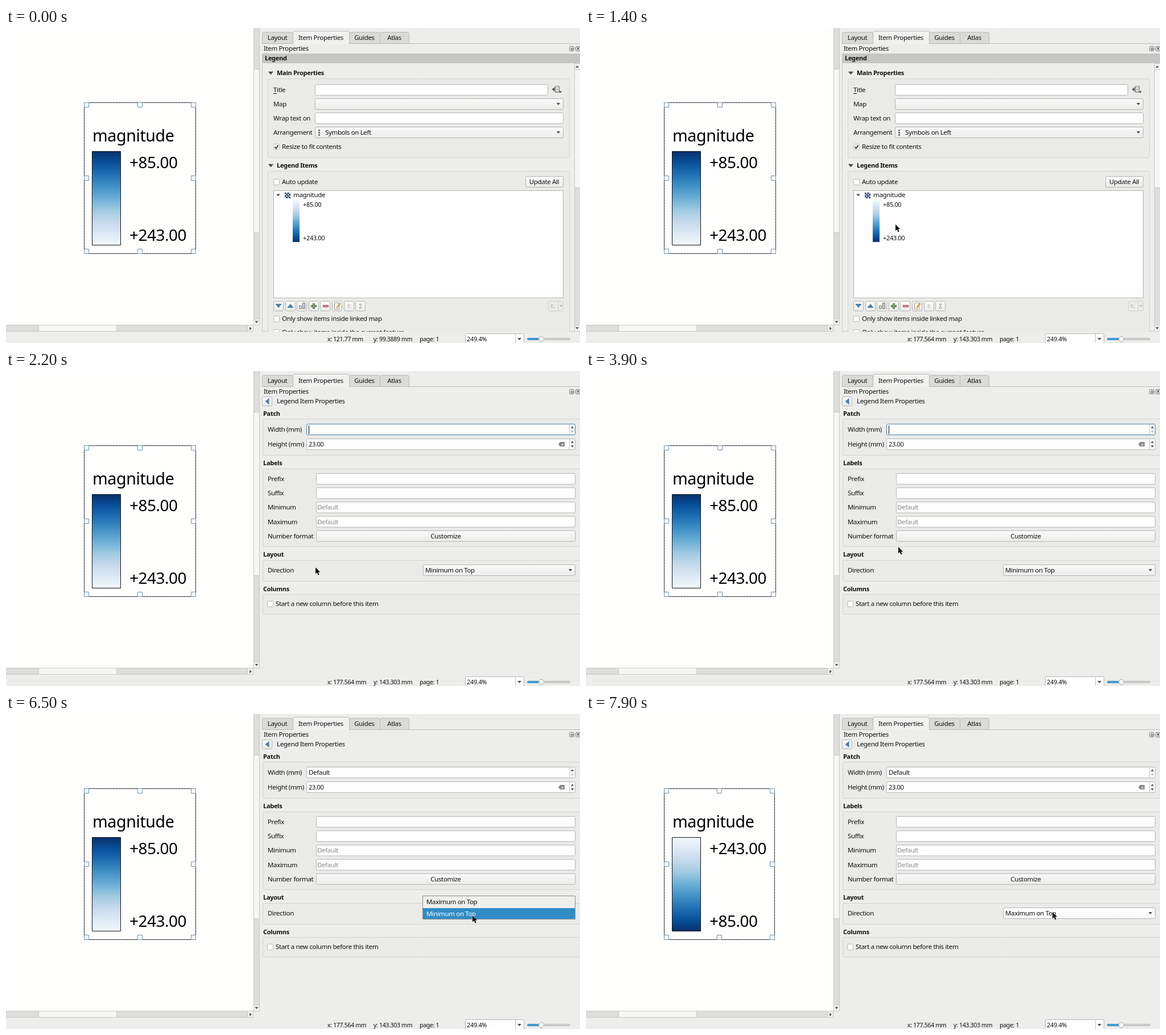
Write an HTML page with a canvas that moves like this. It is 1009 px wide and 555 px high and loops after 8 s.

```html
<!DOCTYPE html>
<html lang="en">
<head>
<meta charset="utf-8">
<title>Legend direction</title>
<style>
html, body { margin: 0; width: 100%; height: 100%; overflow: hidden; background: #ededeb; }
canvas { display: block; }
</style>
</head>
<body>
<canvas id="stage" width="1009" height="555"></canvas>
<script>
const ctx = document.getElementById('stage').getContext('2d');
const LOOP = 8000, STEP = 100;
const BG = '#ededeb', LINE = '#b4b4b2', INK = '#101010', BLUE = '#308cc6';
const BLUES = ['#f4f9fc', '#dde9f5', '#c6d9ec', '#9ecae1', '#6baed6', '#4292c6', '#2171b5', '#08519c', '#08306b'];

// Pointer track: time, x, y
const TRACK = [
  [400, 123, 56], [1200, 494, 334], [1300, 536, 357], [1400, 544, 346], [3600, 544, 346],
  [3900, 549, 310], [4500, 580, 306], [5100, 650, 293], [5300, 650, 293], [5700, 693, 284],
  [6000, 760, 293], [6100, 760, 293], [6300, 814, 348], [6500, 820, 355], [6800, 820, 355],
  [7000, 820, 331], [7700, 820, 331], [7900, 820, 349]
];
const CARET_OFF = [3000, 4000, 4900, 5600];

function pointerAt(t) {
  if (t < TRACK[0][0]) return null;
  const i = TRACK.findIndex(k => k[0] > t);
  if (i < 0) return TRACK[TRACK.length - 1].slice(1);
  const [t0, x0, y0] = TRACK[i - 1], [t1, x1, y1] = TRACK[i];
  const p = (t - t0) / (t1 - t0);
  return [Math.round(x0 + (x1 - x0) * p), Math.round(y0 + (y1 - y0) * p)];
}

function fill(x, y, w, h, color) {
  ctx.fillStyle = color;
  ctx.fillRect(x, y, w, h);
}

function box(x, y, w, h, color, stroke = LINE, radius = 2) {
  ctx.beginPath();
  ctx.roundRect(x + .5, y + .5, w - 1, h - 1, radius);
  ctx.fillStyle = color;
  ctx.fill();
  ctx.strokeStyle = stroke;
  ctx.lineWidth = 1;
  ctx.stroke();
}

function text(s, x, y, { size = 11.5, color = INK, bold = false, align = 'left', gap = -.35 } = {}) {
  ctx.font = `${bold ? 700 : 500} ${size}px "Noto Sans", sans-serif`;
  ctx.letterSpacing = gap + 'px';
  ctx.textAlign = align;
  ctx.fillStyle = color;
  ctx.fillText(s, x, y);
}
const label = (s, x, mid, color) => text(s, x, mid + 4, { color });
const number = (s, x, mid, color) => text(s, x, mid + 4, { size: 11, color });
const heading = (s, x, mid) => text(s, x, mid + 4, { size: 11, bold: true, gap: -.3 });

function shape(points, color) {
  ctx.beginPath();
  points.forEach(([x, y]) => ctx.lineTo(x, y));
  ctx.closePath();
  ctx.fillStyle = color;
  ctx.fill();
}

// Triangle pointing along (dx, dy)
function arrow(x, y, dx, dy, r = 3, color = '#4a4a4a') {
  const b = r * 1.15;
  shape([[x + dx * r * .7, y + dy * r * .7], [x - dx * r * .7 + dy * b, y - dy * r * .7 + dx * b],
    [x - dx * r * .7 - dy * b, y - dy * r * .7 - dx * b]], color);
}

function gradient(y0, y1, colors) {
  const g = ctx.createLinearGradient(0, y0, 0, y1);
  colors.forEach((c, i) => g.addColorStop(i / (colors.length - 1), c));
  return g;
}

const field = (x, y, right, stroke) => box(x, y, right - x, 20, '#fefefe', stroke);
const frame = (x, y, w, h) => box(x, y, w, h, '#eaeae8', '#d3d3d1');

function button(x, y, w, h, hover) {
  box(x, y, w, h, gradient(y, y + h, hover ? ['#ffffff', '#f8f8f8'] : ['#fafafa', '#ebebea']));
}

function combo(x, y, right, s, hover, inset = 4) {
  button(x, y, right - x, 20, hover);
  label(s, x + inset, y + 10);
  arrow(right - 9, y + 10, 0, 1, 2.7);
}

function check(x, y, on, s) {
  box(x, y, 11, 11, '#fefefe', '#b9b9b7', 1);
  if (on) {
    ctx.beginPath();
    ctx.moveTo(x + 2.5, y + 5.5);
    ctx.lineTo(x + 4.7, y + 8.2);
    ctx.lineTo(x + 8.5, y + 2.5);
    ctx.strokeStyle = '#222';
    ctx.lineWidth = 1.7;
    ctx.stroke();
  }
  label(s, x + 15, y + 5);
}

function drawCanvasArea(maxOnTop) {
  fill(0, 0, 435, 523, '#fefefd');
  box(435, -2, 11, 526, '#dddddb', '#c8c8c6', 0);
  box(435, 72, 11, 289, '#f6f6f5', '#c8c8c6', 0);
  box(435, 512, 11, 12, '#f1f1f0', '#c8c8c6', 0);
  arrow(440.5, 518, 0, 1, 2.6);
  box(-2, 523, 437, 12, '#dddddb', '#c8c8c6', 0);
  box(57, 523, 138, 12, '#f6f6f5', '#c8c8c6', 0);
  box(424, 523, 11, 12, '#f1f1f0', '#c8c8c6', 0);
  arrow(430, 529.5, 1, 0, 2.6);
  for (let i = 0; i < 5; i++) {
    fill(448, 158 + i * 3, 1, 1, '#cfcfcd');
    fill(724 + i * 3, 2, 1, 1, '#cfcfcd');
  }

  const right = maxOnTop ? 331 : 333;
  ctx.lineWidth = 1;
  ctx.strokeStyle = '#85859a';
  ctx.strokeRect(137.5, 131.5, right - 137, 266);
  ctx.strokeStyle = '#1c1c24';
  ctx.setLineDash([4, 1]);
  ctx.strokeRect(137.5, 131.5, right - 137, 266);
  ctx.setLineDash([]);
  const centre = Math.round((137 + right) / 2) - 4;
  for (const x of [137, centre, right - 8])
    for (const y of [131, 260, 389])
      if (x !== centre || y !== 260) box(x, y, 9, 9, '#fefefe', '#6d92a6', 0);

  text('magnitude', 152, 200, { size: 28.6, color: '#000', gap: -.4 });
  const colors = maxOnTop ? BLUES : [...BLUES].reverse();
  box(151, 217, 51, 166, gradient(217, 383, colors), '#111', 0);
  const values = ['+85.00', '+243.00'];
  if (maxOnTop) values.reverse();
  values.forEach((v, i) => text(v, 217, 247 + i * 128, { size: 28, color: '#000', gap: -.5 }));
}

function drawDock() {
  fill(450, 27, 559, 1, '#bdbdbb');
  const tabs = [['Layout', 450, 504], ['Guides', 603, 657], ['Atlas', 657, 708], ['Item Properties', 504, 603]];
  tabs.forEach(([s, x, right], i) => {
    const active = i === 3, y = active ? 5 : 7;
    box(x, y, right - x + 1, 28 - y, active ? '#f1f1f0' : '#dadad8', '#b9b9b7', [3, 3, 0, 0]);
    if (active) fill(x + 1, 27, right - x - 1, 1, '#f1f1f0');
    text(s, (x + right) / 2, 21, { align: 'center' });
  });
  label('Item Properties', 453, 36);
  for (const x of [990, 1001]) box(x, 32, 9, 9, '#e8e8e6', '#777', 2);
  box(993, 35, 4, 4, '#e8e8e6', '#555', 0);
  text('×', 1005.5, 40, { size: 10, align: 'center', gap: 0 });
}

function drawToolButtons() {
  for (let i = 0; i < 8; i++) button(470 + Math.round(i * 20.6), 481, 18, 18);
  arrow(479, 489.5, 0, 1, 5, '#4f7ca8');
  arrow(500, 489.5, 0, -1, 5, '#4f7ca8');
  box(515, 489, 5, 6, '#ddd', '#777', 0);
  box(521, 484, 5, 11, '#ccc', '#777', 0);
  box(536, 488, 10, 4, '#8fae7e', '#59714d', 0);
  box(539, 485, 4, 10, '#8fae7e', '#59714d', 0);
  fill(540, 488, 2, 4, '#8fae7e');
  box(557, 488, 10, 4, '#d98b92', '#a4525c', 0);
  box(577, 484, 9, 12, '#fff', '#999', 0);
  shape([[580, 493], [586, 484], [589, 486], [582, 494]], '#dfa24b');
  text('ε', 603, 493, { align: 'center', color: '#b3b3b1', gap: 0 });
  text('Σ', 623.5, 494, { align: 'center', color: '#8f8f8d', gap: 0 });
  box(953, 481, 27, 18, '#ebebe9', '#cfcfcd');
  text('ε,', 957, 493, { color: '#b3b3b1' });
  fill(970, 482, 1, 16, '#cfcfcd');
  arrow(975.5, 490, 0, 1, 2.2, '#b3b3b1');
}

function drawLegendPanel(selected) {
  fill(450, 45, 559, 17, '#c5c5c3');
  heading('Legend', 455, 53);
  ctx.save();
  ctx.beginPath();
  ctx.rect(450, 62, 559, 473);
  ctx.clip();
  fill(450, 62, 1, 473, '#c8c8c6');
  fill(450, 534, 559, 1, '#c8c8c6');
  box(999, 62, 11, 473, '#dddddb', '#c8c8c6', 0);
  box(999, 62, 11, 12, '#f1f1f0', '#c8c8c6', 0);
  box(999, 73, 11, 209, '#f6f6f5', '#c8c8c6', 0);
  box(999, 523, 11, 12, '#f1f1f0', '#c8c8c6', 0);
  arrow(1004, 68, 0, -1, 2.6);
  arrow(1004, 529, 0, 1, 2.6);

  arrow(465.5, 79.5, 0, 1, 4);
  heading('Main Properties', 476, 79);
  frame(460, 89, 531, 140);
  ['Title', 'Map', 'Wrap text on', 'Arrangement'].forEach((s, i) => label(s, 470, 109 + i * 25));
  fill(470, 115, 6, 1, INK);
  field(543, 99, 953);
  combo(543, 124, 980, '');
  field(543, 149, 980);
  combo(543, 174, 980, 'Symbols on Left', false, 18);
  for (let i = 0; i < 3; i++) fill(549, 179 + i * 4, 3, 3, '#777');
  arrow(962, 108, -1, 0, 3.5, '#555');
  box(965, 102, 8, 12, '#f4f4f3', '#777', 0);
  for (let i = 0; i < 3; i++) fill(966, 105 + i * 3, 6, 1, '#888');
  arrow(974.5, 113, 0, 1, 2, '#333');
  check(470, 204, true, 'Resize to fit contents');

  arrow(465.5, 242.5, 0, 1, 4);
  heading('Legend Items', 476, 242);
  frame(460, 252, 531, 300);
  check(470, 266, false, 'Auto update');
  button(913, 261, 67, 20);
  text('Update All', 946, 275, { align: 'center' });
  box(470, 286, 510, 190, '#fefefe', LINE, 0);
  arrow(478.5, 294.5, 0, 1, 2.8);
  for (let i = 0; i < 16; i++)
    fill(490 + i % 4 * 2.5, 290 + (i >> 2) * 2.5, 2.5, 2.5, ((i + (i >> 2)) % 2) ? '#a9c0d6' : '#1f3350');
  label('magnitude', 505, 294);
  if (selected) fill(471, 301, 508, 76, BLUE);
  fill(504, 303, 12, 74, gradient(303, 377, BLUES));
  const ink = selected ? '#fff' : INK;
  number('+85.00', 522, 311, ink);
  number('+243.00', 522, 370, ink);
  drawToolButtons();
  check(470, 507, false, 'Only show items inside linked map');
  check(470, 531, false, 'Only show items inside the current feature');
  ctx.restore();
}

function drawItemPanel(state) {
  button(450, 45, 18, 17);
  arrow(459, 53.5, -1, 0, 5, '#4f7ca8');
  label('Legend Item Properties', 476, 53);

  heading('Patch', 452, 75);
  frame(451, 84, 570, 65);
  label('Width (mm)', 460, 103);
  label('Height (mm)', 460, 129);
  [93, 119].forEach((y, i) => {
    field(528, y, 1001, !i && state.editing ? '#4583a8' : LINE);
    fill(990, y + 1, 1, 18, '#c4c4c2');
    arrow(995.5, y + 6, 0, -1, 2.4);
    arrow(995.5, y + 14, 0, 1, 2.4, i ? '#4a4a4a' : '#b5b5b3');
  });
  if (!state.editing) label('Default', 532, 103);
  else if (state.caret) fill(532, 96, 1, 15, '#000');
  number('23.00', 532, 129);
  shape([[971, 129], [974, 125], [982, 125], [982, 133], [974, 133]], '#888');
  text('×', 978, 132.5, { size: 9, align: 'center', color: '#fff', gap: 0 });

  heading('Labels', 452, 162);
  frame(451, 172, 570, 138);
  ['Prefix', 'Suffix', 'Minimum', 'Maximum', 'Number format'].forEach((s, i) => {
    const y = 180 + i * 25.2, mid = Math.round(y + 10);
    label(s, 460, mid);
    if (i < 4) field(545, y, 1001);
    else button(545, y, 456, 20, state.over(545, 281, 456, 20));
    if (i === 2 || i === 3) label('Default', 547, mid, '#8a8a88');
  });
  text('Customize', 773, 295, { align: 'center' });

  heading('Layout', 452, 323);
  frame(451, 333, 570, 38);
  label('Direction', 460, 351);
  combo(733, 341, 1001, state.closed ? 'Maximum on Top' : 'Minimum on Top',
    !state.popup && state.over(733, 341, 268, 20));

  heading('Columns', 452, 384);
  frame(451, 393, 570, 36);
  check(459, 405, false, 'Start a new column before this item');

  if (state.popup) {
    box(732, 320, 269, 42, '#efefed', '#8d8d8b', 0);
    fill(733, state.pickMax ? 321 : 342, 267, state.pickMax ? 21 : 19, BLUE);
    label('Maximum on Top', 739, 331, state.pickMax ? '#fff' : INK);
    label('Minimum on Top', 739, 352, state.pickMax ? INK : '#fff');
  }
}

function drawStatus(pointer) {
  const p = pointer ? Math.min(1, Math.max(0, (pointer[0] - 123) / 312)) : 0;
  const mm = (from, to) => Number((from + (to - from) * p).toPrecision(6)) + ' mm';
  const status = (s, x) => text(s, x, 552, { size: 10.6 });
  status('x: ' + mm(121.77, 177.564), 565);
  status('y: ' + mm(99.3889, 143.303), 646);
  status('page: 1', 727);
  box(807, 538, 104, 22, '#fefefe');
  fill(895, 539, 1, 16, '#c4c4c2');
  number('249.4%', 810, 548);
  arrow(902.5, 548, 0, 1);
  box(916, 546, 76, 4, '#d2d2d0', '#b9b9b7', 2);
  box(916, 546, 22, 4, '#4ba0d6', BLUE, 2);
  box(936, 543, 10, 10, '#f8f8f7', '#a5a5a3', 5);
}

function drawPointer([x, y]) {
  const outline = [[0, 0], [0, 11.5], [2.6, 9.1], [4.6, 13.5], [6.6, 12.6], [4.7, 8.4], [8.2, 8.2]];
  ctx.strokeStyle = '#fff';
  ctx.lineWidth = 1;
  ctx.lineJoin = 'round';
  ctx.beginPath();
  outline.forEach(([dx, dy]) => ctx.lineTo(x + dx, y + dy));
  ctx.closePath();
  ctx.stroke();
  ctx.fillStyle = '#0a0a0a';
  ctx.fill();
}

function draw(t) {
  const pointer = pointerAt(t);
  const state = {
    editing: t < 6400,
    caret: !CARET_OFF.some(s => t >= s && t < s + 400),
    popup: t >= 6400 && t < 7200,
    pickMax: t >= 6900,
    closed: t >= 7200,
    over: (x, y, w, h) => pointer && pointer[0] >= x && pointer[0] < x + w && pointer[1] >= y && pointer[1] < y + h
  };
  fill(0, 0, 1009, 555, BG);
  drawCanvasArea(t >= 7300);
  drawDock();
  if (t < 2200) drawLegendPanel(t >= 2000);
  else drawItemPanel(state);
  drawStatus(pointer);
  if (pointer) drawPointer(pointer);
}

const start = performance.now();
function tick() {
  const t = (performance.now() - start) % LOOP;
  draw(Math.floor(t / STEP) * STEP);
  requestAnimationFrame(tick);
}
tick();
</script>
</body>
</html>
```
